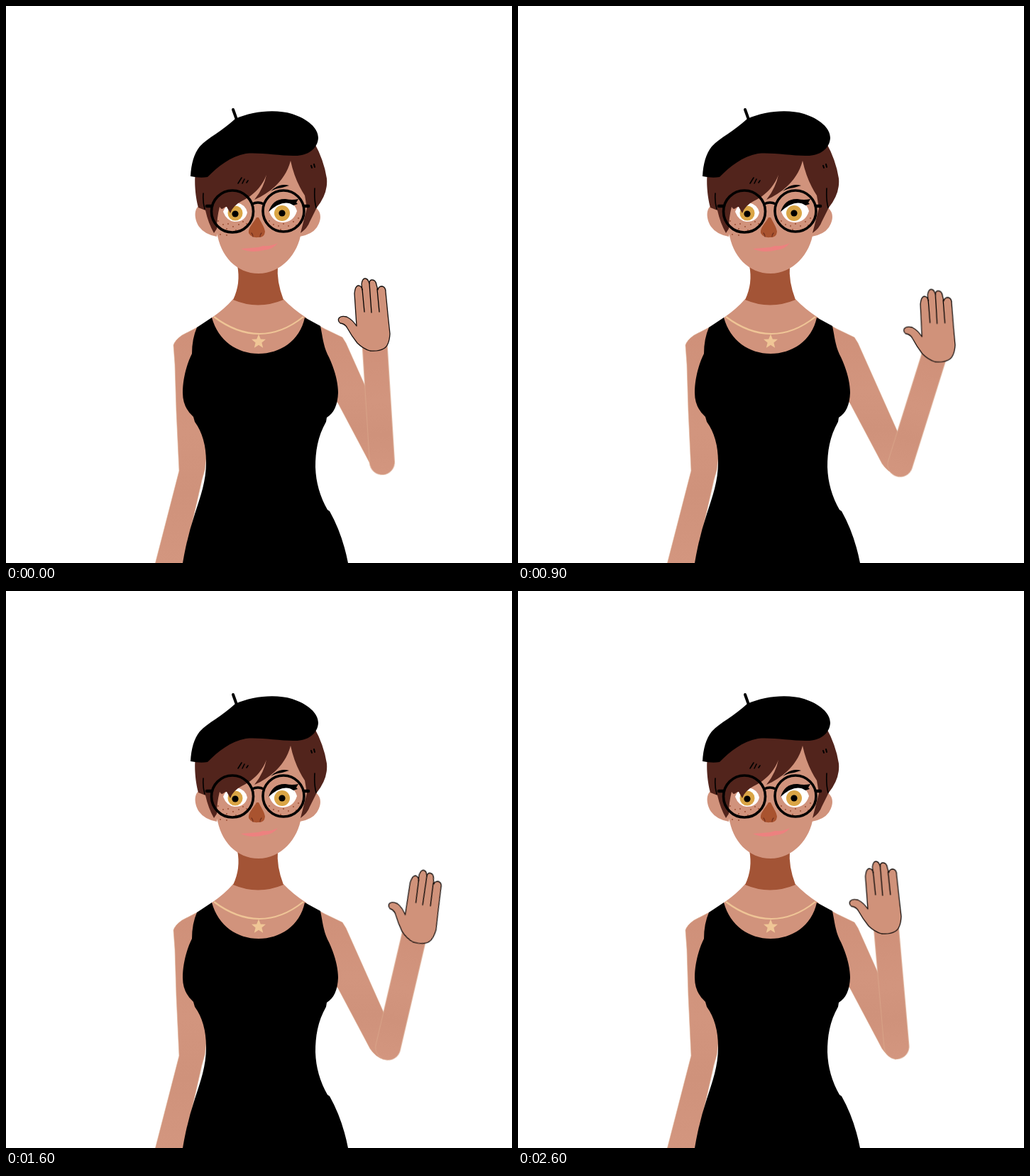
An HTML page that plays this animation: 713 px wide and 785 px high, repeating every 2.7 s.

```html
<!DOCTYPE html>
<html lang="en">
<head>
<meta charset="utf-8">
<title>Waving hello</title>
<style>
  html, body { margin: 0; width: 100%; height: 100%; overflow: hidden; background: #fff; }
  svg { display: block; width: 100vw; height: 100vh; }
  .skin { fill: #d1937c; }
  .hair { fill: #52241c; }
  .line { fill: none; stroke: #000; stroke-linecap: round; stroke-linejoin: round; }
  .arm { fill: url(#armTone); stroke: #dcae91; stroke-width: .6; }
  .frame { stroke-width: 3.6; }
  #forearm, #hand { transform-origin: 0 0; animation: 2.7s infinite; }
  #forearm { animation-name: swing; }
  #hand { animation-name: wave; }

  /* Each stretch advances in 100 ms steps. */
  @keyframes swing {
    0%      { transform: translate(530px, 643px) rotate(-3.6deg); animation-timing-function: steps(5); }
    18.518% { transform: translate(535.5px, 645.5px) rotate(8deg); animation-timing-function: steps(4); }
    33.333% { transform: translate(538.5px, 646px) rotate(17.4deg); animation-timing-function: steps(3); }
    44.444% { transform: translate(541px, 645.5px) rotate(24deg); animation-timing-function: steps(1); }
    48.148% { transform: translate(541px, 645px) rotate(21.4deg); animation-timing-function: steps(5); }
    66.666% { transform: translate(536.5px, 642.5px) rotate(7.7deg); animation-timing-function: steps(4); }
    81.481% { transform: translate(534px, 642px) rotate(0deg); animation-timing-function: steps(4); }
    96.296%, 100% { transform: translate(533.5px, 642px) rotate(-5deg); }
  }
  @keyframes wave {
    0%      { transform: translate(516px, 461px) rotate(0deg); animation-timing-function: steps(5); }
    18.518% { transform: translate(557.5px, 470px) rotate(.3deg); animation-timing-function: steps(4); }
    33.333% { transform: translate(591px, 476.5px) rotate(1deg); animation-timing-function: steps(3); }
    44.444% { transform: translate(616px, 481px) rotate(1.4deg); animation-timing-function: steps(1); }
    48.148% { transform: translate(607px, 479px) rotate(4.2deg); animation-timing-function: steps(5); }
    66.666% { transform: translate(565px, 465.5px) rotate(18deg); animation-timing-function: steps(4); }
    81.481% { transform: translate(537px, 459px) rotate(16.5deg); animation-timing-function: steps(4); }
    96.296%, 100% { transform: translate(515px, 458px) rotate(-.5deg); }
  }
</style>
</head>
<body>
<svg viewBox="0 0 713 785">
  <defs>
    <linearGradient id="armTone" x1="0" y1="0" x2="0" y2="1">
      <stop offset="0" stop-color="#cf9079"/>
      <stop offset=".45" stop-color="#d2957e"/>
      <stop offset=".7" stop-color="#cf927b"/>
      <stop offset="1" stop-color="#d3967f"/>
    </linearGradient>
    <path id="star" d="M0-10.5 2.8-3.6 10-3.2 4.4 1.6 6.2 8.8 0 4.8-6.2 8.8-4.4 1.6-10-3.2-2.8-3.6Z"/>
  </defs>

  <!-- arms behind the dress -->
  <path class="arm" d="M275 450 248 464Q238 471 236 478L238 505 240 570 244 655 210 787H249L276 668 280 654 283 630 285 500Z"/>
  <path class="arm" d="M440 450 449 455 474 467 479 475 537 605 545 637Q545 659 532 660 521 657 513 645L468 560 440 530Z"/>

  <!-- neck and chest -->
  <path class="skin" d="M320 413Q308 427 289 440V500H424V440Q404 427 391 413Z"/>
  <path fill="#a35436" d="M326 355V366Q331 391 320 414 355 429 391 414 381 388 383 366V355Z"/>

  <!-- dress -->
  <path d="M290 439C299 472 326 490 356 490S414 472 421 439L443 451C446 465 447 478 453 491C461 506 468 528 468 545
    Q467 571 452 580L451 586C439 607 436 628 436 650Q437 682 453 710L456 712Q474 744 482 785H249
    Q255 749 266 716C274 691 282 670 282 643Q282 608 266 586L264 579Q249 566 249 545C249 525 255 504 262 490Q262 469 269 453Z"/>
  <path d="M293 438Q325 462 357 462T419 438" fill="none" stroke="#efc596" stroke-width="2.2"/>
  <use href="#star" x="356" y="473" fill="#f0c696"/>

  <!-- head -->
  <path class="skin" d="M274 280C263 286 266 302 272 311Q280 322 297 325L305 285ZM436 284C446 291 444 303 438 312Q431 322 414 325L410 288Z"/>
  <path class="skin" d="M288 208H430V300L416 318C412 350 387 377 356 377S302 353 297 318Z"/>

  <!-- eyes -->
  <path fill="#fff" d="M306 290Q311 276 325 277 338 280 340 291 337 304 322 304 311 303 306 290ZM371 290Q375 275 391 274 406 275 410 289 405 305 389 305 376 304 371 290Z"/>
  <g fill="#daa545"><circle cx="323" cy="292" r="10.5"/><circle cx="389" cy="292" r="11"/></g>
  <circle cx="323" cy="293" r="4.6"/><circle cx="389" cy="292" r="4.6"/>
  <path d="M370 290Q376 271 394 272 403 274 412 272L409 277 411 279 405 281Q391 271 370 290Z"/>
  <path d="M373 261Q385 249 399 253L389 256Q380 257 373 261Z"/>

  <!-- nose, mouth, freckles -->
  <path fill="#a9532f" d="M353 298C348 307 341 312 342 320Q346 327 355 326 364 327 365 318C364 311 360 306 356 298Z"/>
  <path class="line" style="stroke:#70301d;stroke-width:1.2" d="M346 320Q348 322 348 325M360 320Q358 322 358 325"/>
  <path fill="#ed817f" d="M331 342Q346 341 356 340L362 338Q374 339 383 334 376 343 364 344 345 349 331 342Z"/>
  <path class="line" style="stroke:#97492f;stroke-width:1.8" d="M299 303h0M306 308h0M313 307h0M320 311h0M328 308h0M334 304h0M311 314h0M302 322h0M311 323h0M324 316h0M339 307h0
    M371 303h0M377 308h0M384 310h0M391 307h0M398 310h0M405 304h0M412 299h0M401 315h0M387 315h0M409 309h0M414 304h0"/>

  <!-- hair -->
  <path class="hair" d="M267 235C265 248 267 270 271 284L281 288Q285 306 293 320L297 314Q297 299 301 283C305 290 307 282 311 283L316 292
    Q320 281 332 275C349 267 361 254 367 238Q363 257 350 273C371 264 394 246 401 218Q407 246 421 267L424 285 415 320
    Q425 313 428 304L438 284Q454 264 452 243 448 217 434 192L350 190Z"/>
  <path class="line" stroke-width="1.6" d="M278 264Q277 276 280 286M435 257Q434 273 437 284M327 250 332 242M333 250 336 244M339 249 341 246"/>
  <path class="line" stroke-width="2" d="M430 225 431 228M434 223 435 227"/>

  <!-- glasses -->
  <g class="line frame">
    <circle cx="319" cy="289.5" r="29.5"/>
    <circle cx="391" cy="289" r="29"/>
    <path d="M347 279Q355 275 363 279"/>
    <path stroke-width="4.6" d="M283 282H290M420 282H426"/>
  </g>

  <!-- beret -->
  <path d="M260 240C261 222 265 208 273 198 284 186 305 176 323 159 347 148 380 145 403 152 425 159 440 172 440 186
    439 202 424 212 405 211 383 211 357 206 338 208 316 212 299 226 284 241Q274 243 260 240Z"/>
  <path class="line" stroke-width="4" stroke-linecap="butt" d="M320 146 325 160"/>

  <!-- waving arm -->
  <path id="forearm" class="arm" d="M-17.6-170H17.6V0A17.6 17.6 0 0 1-17.6 0Z"/>
  <g id="hand">
    <path fill="#d0927a" stroke="#17100e" stroke-width="1.3" stroke-linejoin="round"
      d="M-21 14Q-29 4-35-7-38-13-45-14-49-17-47-21-44-25-36-23-28-19-22-10L-25-56Q-24-66-20-67-15-67-14-61
      L-15-69Q-14-77-10-77-6-77-4-70-4-75 0-75 5-75 6-68L8-61Q9-66 14-66 19-65 19-58L22-27 25 1Q24 18 16 22 9 26-3 25-13 22-21 14Z"/>
    <path class="line" stroke-width="1.3" d="M-14-62-11-30M-4-70-1-29M7-62 10-30"/>
  </g>
</svg>
</body>
</html>
```
